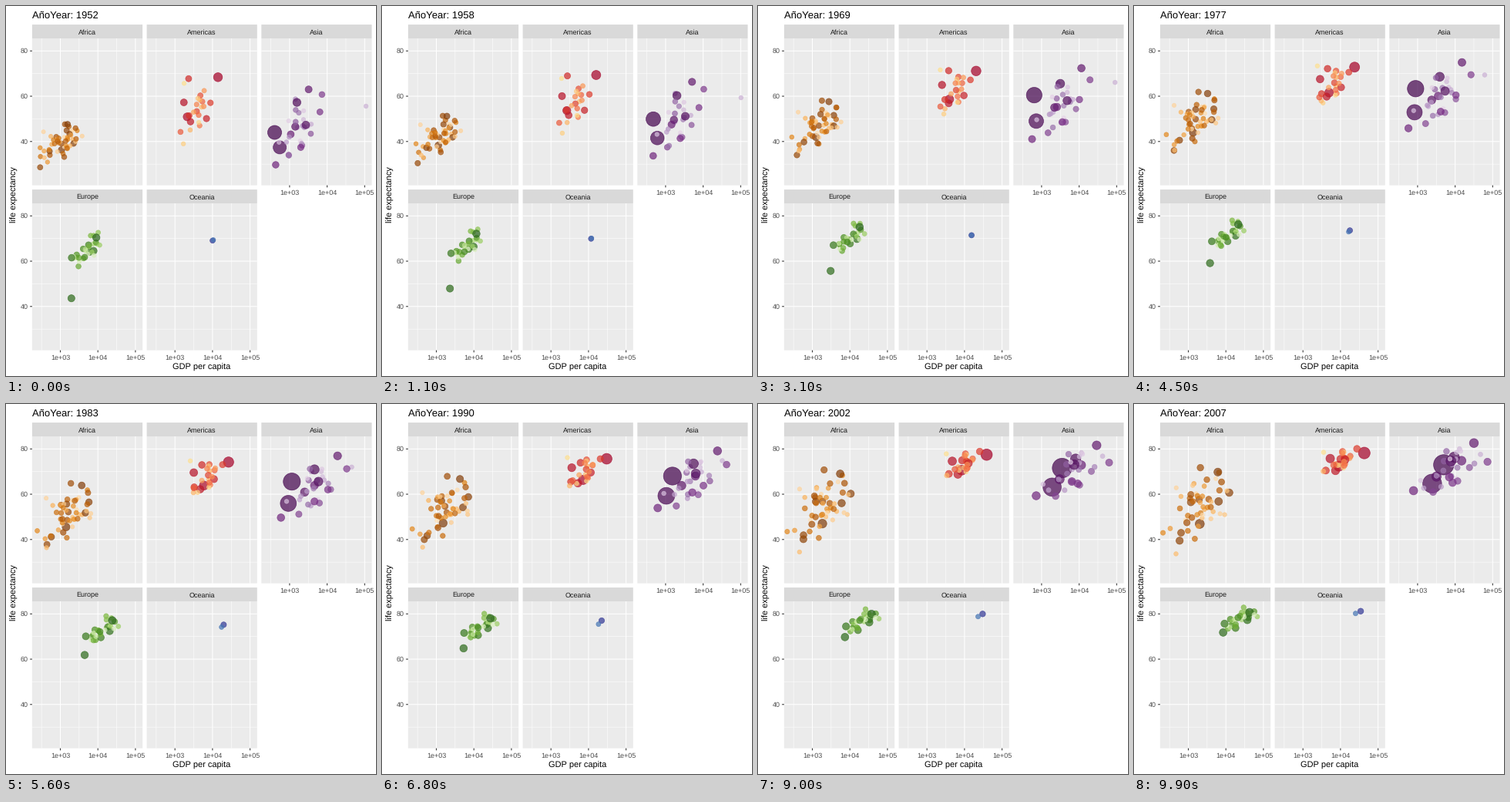
These frames come from a looping animation (480x480 px, 10000 ms). A matplotlib script:

```python
import numpy as np
import matplotlib
import matplotlib.pyplot as plt
from matplotlib.animation import FuncAnimation
from matplotlib.colors import to_rgb
from matplotlib.patches import Rectangle

matplotlib.rcParams["font.family"] = "Liberation Sans"
matplotlib.rcParams["text.hinting"] = "none"
matplotlib.rcParams["text.hinting_factor"] = 1

SIZE, DPI, FRAMES = 480, 96, 100
PT = 72 / DPI

LEFT, TOP, WIDTH, HEIGHT = 33.9, 42.0, 143.2, 190.6
STRIP, GAP = 17.9, 5.5
X_MIN, X_SPAN = 2.2487, 2.9401
Y_MAX, Y_SPAN = 85.55, 64.9

FIRST, LAST = 1952, 2007
STOPS = (FIRST, 1969, 1990, LAST)
TURN = 0.7  # how far countries trade places within their cloud, in radians

# Largest and outlying countries: population, GDP and life expectancy at STOPS
LANDMARKS = {
    "Africa": [(135, (1077, 1240, 1520, 2014), (36.3, 41.9, 47.3, 46.9))],
    "Americas": [
        (301, (13990, 20300, 30600, 42952), (68.4, 71.1, 75.7, 78.2)),
        (190, (2109, 3950, 7200, 9066), (50.9, 58.6, 66.4, 72.4)),
    ],
    "Asia": [
        (1319, (400, 630, 1540, 4959), (44, 60.4, 68.1, 73)),
        (1110, (547, 718, 1050, 2452), (37.4, 48.9, 59.4, 64.7)),
        (127, (3217, 11400, 24300, 31656), (63, 72.3, 79.2, 82.6)),
        (2.5, (108382, 91500, 32000, 47307), (55.6, 66, 74.9, 77.6)),
    ],
    "Europe": [(71, (1969, 3050, 5350, 8458), (43.6, 55.6, 64.9, 71.8))],
    "Oceania": [
        (20.4, (10040, 15350, 22500, 34435), (69.1, 71.4, 77.1, 81.2)),
        (4.1, (10557, 15350, 18500, 25185), (69.4, 71.4, 75.5, 80.2)),
    ],
}

# All other countries: count, largest population and its decay by rank,
# mean log GDP and its spread, mean life expectancy and its spread,
# correlation of the two
CLOUDS = {
    "Africa": (51, 80, 0.11, (2.99, 3.13, 3.19, 3.25), (0.33, 0.43),
               (39.1, 46.3, 53, 54.8), (5, 9.5), 0.45),
    "Americas": (23, 109, 0.19, (3.5, 3.66, 3.79, 3.92), (0.22, 0.28),
                 (53.3, 61.3, 68.9, 73.6), (8.5, 4.5), 0.65),
    "Asia": (29, 224, 0.2, (3.2, 3.45, 3.62, 3.77), (0.38, 0.6),
             (46.3, 55.8, 66, 70.7), (8.5, 7.5), 0.7),
    "Europe": (29, 82, 0.19, (3.69, 3.97, 4.15, 4.35), (0.25, 0.27),
               (65, 70.2, 74.2, 77.7), (4.5, 2.9), 0.8),
}

# title, grid cell, population in 1952 relative to 2007, colour ramp
CONTINENTS = [
    ("Africa", (0, 0), 0.26, "#7F3B08 #B35806 #E08214 #FDB863 #FEE0B6"),
    ("Americas", (1, 0), 0.42, "#A50026 #D73027 #F46D43 #FDAE61 #FEE090"),
    ("Asia", (2, 0), 0.38, "#40004B #762A83 #9970AB #C2A5CF #E7D4E8"),
    ("Europe", (0, 1), 0.72, "#276419 #4D9221 #7FBC41 #B8E186 #E6F5D0"),
    ("Oceania", (1, 1), 0.45, "#313695 #4575B4"),
]


def origin(cell):
    return LEFT + cell[0] * (WIDTH + GAP), TOP + cell[1] * (HEIGHT + STRIP + GAP)


def to_x(cell, log_gdp):
    return origin(cell)[0] + (log_gdp - X_MIN) / X_SPAN * WIDTH


def to_y(cell, life):
    return origin(cell)[1] + (Y_MAX - life) / Y_SPAN * HEIGHT


def ramp(stops, n):
    rgb = np.array([to_rgb(s) for s in stops.split()])
    pos = np.linspace(0, len(rgb) - 1, n)
    return np.array([np.interp(pos, range(len(rgb)), ch) for ch in rgb.T]).T


def at(year, values):
    """Value at a year, from values spread over STOPS or over both ends."""
    return np.interp(year, STOPS if len(values) == 4 else (FIRST, LAST), values)


def diameter(pop):
    size = 2 + 10 * np.sqrt(pop / 1319)
    return 0.75 * (size * 2.845 + 0.945)


class Continent:
    def __init__(self, title, cell, growth, stops, rng):
        self.cell, self.growth = cell, growth
        self.marks = LANDMARKS[title]
        self.cloud = CLOUDS.get(title)
        pop = [m[0] for m in self.marks]
        if self.cloud:
            n, top, decay, *_, corr = self.cloud
            pop += list(top * np.exp(-decay * rng.permutation(n)))
            self.wealth = rng.normal(size=(2, n)).clip(-1.6, 2.1)
            luck = rng.normal(size=(2, n))
            health = corr * self.wealth + np.sqrt(1 - corr ** 2) * luck
            self.health = health.clip(-2.1, 1.7)
        self.pop = np.array(pop)
        rank = np.argsort(np.argsort(-self.pop))
        self.colors = np.c_[ramp(stops, len(pop))[rank], np.full(len(pop), 0.7)]

    def state(self, year):
        """Pixel positions and diameters of all countries."""
        t = (year - FIRST) / (LAST - FIRST)
        gdp = [at(year, np.log10(m[1])) for m in self.marks]
        life = [at(year, m[2]) for m in self.marks]
        if self.cloud:
            g_mean, g_spread, l_mean, l_spread = self.cloud[3:7]
            mix = np.array([np.cos(TURN * t), np.sin(TURN * t)])
            gdp = np.r_[gdp, at(year, g_mean) + at(year, g_spread) * (mix @ self.wealth)]
            life = np.r_[life, at(year, l_mean) + at(year, l_spread) * (mix @ self.health)]
        xy = np.c_[to_x(self.cell, np.array(gdp)), to_y(self.cell, np.array(life))]
        return xy, diameter(self.pop * self.growth ** (1 - t))


fig = plt.figure(figsize=(SIZE / DPI, SIZE / DPI), dpi=DPI, facecolor="white")
ax = fig.add_axes([0, 0, 1, 1])
ax.set_xlim(0, SIZE)
ax.set_ylim(SIZE, 0)
ax.axis("off")


def box(x, y, w, h, color):
    ax.add_patch(Rectangle((x, y), w, h, fc=color, lw=0, snap=False, zorder=1))


def line(x0, y0, x1, y1, width=1.07, color="white"):
    ax.plot([x0, x1], [y0, y1], color=color, lw=width * PT, snap=False,
            solid_capstyle="butt", zorder=2)


def label(x, y, text, size=8.8, color="#4D4D4D", ha="center", **kw):
    return ax.text(x, y, text, fontsize=size * PT, color=color, ha=ha,
                   va="baseline", **kw)


def draw_panel(title, cell):
    x, y = origin(cell)
    right, bottom = x + WIDTH, y + HEIGHT
    box(x, y - STRIP, WIDTH, STRIP, "#D9D9D9")
    box(x, y, WIDTH, HEIGHT, "#EBEBEB")
    label(x + WIDTH / 2, y - 5.5, title, color="#1A1A1A")
    for k in (2.5, 3.5, 4.5):
        line(to_x(cell, k), y, to_x(cell, k), bottom, 0.53)
    for life in (30, 50, 70):
        line(x, to_y(cell, life), right, to_y(cell, life), 0.53)
    for k in (3, 4, 5):
        gx = to_x(cell, k)
        line(gx, y, gx, bottom)
        if cell[0] == 2 or cell[1] == 1:
            line(gx, bottom, gx, bottom + 2.75, color="#333333")
            label(gx, bottom + 12, f"1e+0{k}")
    for life in (40, 60, 80):
        gy = to_y(cell, life)
        line(x, gy, right, gy)
        if cell[0] == 0:
            line(x - 2.75, gy, x, gy, color="#333333")
            label(x - 4.95, gy + 3.1, str(life), ha="right")


rng = np.random.default_rng(11)
continents = []
for title, cell, growth, stops in CONTINENTS:
    draw_panel(title, cell)
    continents.append(Continent(title, cell, growth, stops, rng))

label(254, 471.6, "GDP per capita", 11, "black")
label(13.6, 244.5, "life expectancy", 11, "black", rotation=90,
      rotation_mode="anchor")
heading = label(LEFT, 15.4, "", 13.2, "black", ha="left")
colors = np.vstack([c.colors for c in continents])
points = ax.scatter(*np.zeros((2, len(colors))), s=1, c=colors,
                    edgecolors=colors, linewidths=0.71 * PT, zorder=3)


def update(i):
    year = FIRST + (LAST - FIRST) * i / (FRAMES - 1)
    xy, size = zip(*(c.state(year) for c in continents))
    points.set_offsets(np.vstack(xy))
    points.set_sizes((np.concatenate(size) * PT) ** 2)
    heading.set_text(f"AñoYear: {round(year)}")
    return points, heading


anim = FuncAnimation(fig, update, frames=FRAMES, interval=100, repeat=True,
                     repeat_delay=0)
plt.show()
```
